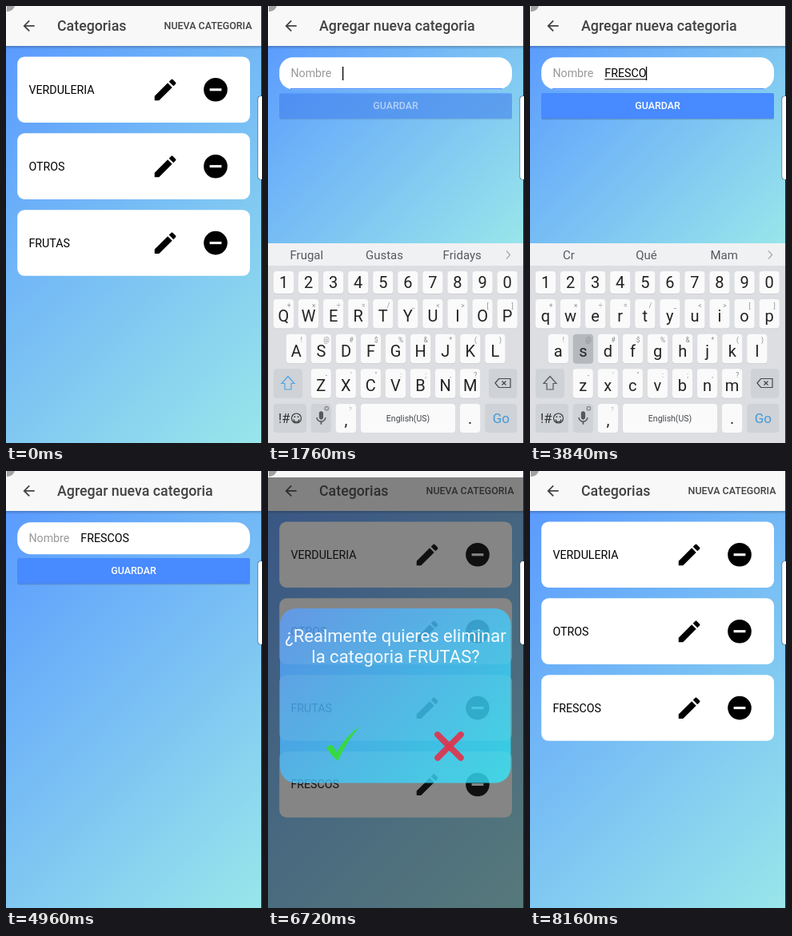
These frames come from a looping animation (320 px wide and 547 px high, 9.76 s). An HTML page with a canvas:

```html
<!DOCTYPE html>
<html lang="es">
<head>
<meta charset="utf-8">
<title>Categorias</title>
<style>
html, body { margin: 0; width: 100%; height: 100%; overflow: hidden; background: #fff; }
canvas { display: block; width: 320px; height: 547px; }
</style>
</head>
<body>
<canvas id="stage"></canvas>
<script>
const W = 320, H = 547, LOOP = 9760, STEP = 160, KEY_TOP = 297;
const canvas = document.getElementById('stage');
const ctx = canvas.getContext('2d');
const dpr = window.devicePixelRatio || 1;
canvas.width = W * dpr;
canvas.height = H * dpr;

const INK = '#424242', BLUE = '#488aff';
const PENCIL = new Path2D('M3 17.25V21h3.75L17.81 9.94l-3.75-3.75L3 17.25zM20.71 7.04c.39-.39.39-1.02 0-1.41l-2.34-2.34c-.39-.39-1.02-.39-1.41 0l-1.83 1.83 3.75 3.75 1.83-1.83z');
const BACK = new Path2D('M20 11H7.83l5.59-5.59L12 4l-8 8 8 8 1.41-1.41L7.83 13H20v-2z');
const MIC = new Path2D('M12 14c1.66 0 3-1.34 3-3V5c0-1.66-1.34-3-3-3S9 3.34 9 5v6c0 1.66 1.34 3 3 3zM17.3 11c0 3-2.54 5.1-5.3 5.1S6.7 14 6.7 11H5c0 3.41 2.72 6.23 6 6.72V21h2v-3.28c3.28-.48 6-3.3 6-6.72h-1.7z');

function text(str, x, y, size, color, align = 'left', weight = 400) {
  ctx.font = `${weight} ${size}px Roboto, sans-serif`;
  ctx.textAlign = align;
  ctx.fillStyle = color;
  ctx.fillText(str, x, y);
}

function rect(x, y, w, h, color) {
  ctx.fillStyle = color;
  ctx.fillRect(x, y, w, h);
}

function box(x, y, w, h, r, color) {
  ctx.beginPath();
  ctx.roundRect(x, y, w, h, r);
  ctx.fillStyle = color;
  ctx.fill();
}

function disc(x, y, r, color) {
  ctx.beginPath();
  ctx.arc(x, y, r, 0, Math.PI * 2);
  ctx.fillStyle = color;
  ctx.fill();
}

function line(points, color, width, close) {
  ctx.beginPath();
  points.forEach(([x, y]) => ctx.lineTo(x, y));
  if (close) ctx.closePath();
  ctx.strokeStyle = color;
  ctx.lineWidth = width;
  ctx.stroke();
}

function icon(path, x, y, scale, color) {
  ctx.save();
  ctx.translate(x, y);
  ctx.scale(scale, scale);
  ctx.fillStyle = color;
  ctx.fill(path);
  ctx.restore();
}

function layer(alpha, dy, draw) {
  ctx.save();
  ctx.globalAlpha *= alpha;
  ctx.translate(0, dy);
  draw();
  ctx.restore();
}

// 135 degree gradient over a box
function diagonal(x, y, w, h, from, to) {
  const cx = x + w / 2, cy = y + h / 2, d = (w + h) / 4;
  const g = ctx.createLinearGradient(cx - d, cy - d, cx + d, cy + d);
  g.addColorStop(0, from);
  g.addColorStop(1, to);
  return g;
}

function backdrop(bottom) {
  rect(0, 8, W, bottom - 8, diagonal(0, 8, W, bottom - 8, '#5797ff', '#99e6ea'));
}

function header(title, action) {
  const shade = ctx.createLinearGradient(0, 50, 0, 54);
  shade.addColorStop(0, 'rgba(0,0,0,.22)');
  shade.addColorStop(1, 'rgba(0,0,0,0)');
  rect(0, 50, W, 4, shade);
  rect(0, 0, W, 50, '#f8f8f8');
  icon(BACK, 17.9, 14.3, 0.889, INK);
  text(title, 64, 31.3, 17.78, INK, 'left', 500);
  if (action) text(action, 307.5, 29.2, 12.44, INK, 'right', 500);
}

function card(label, i) {
  const y = 63.4 + i * 95.9;
  box(14.2, y, 290.8, 82.6, 9, '#fff');
  text(label, 28.4, y + 46.3, 14.22, '#000');
  icon(PENCIL, 181.3, y + 23.8, 1.482, '#000');
  disc(262, y + 41.4, 14.8, '#000');
  rect(254.6, y + 39.8, 14.8, 3.1, '#fff');
}

function listPage(items) {
  backdrop(H);
  items.forEach(card);
  header('Categorias', 'NUEVA CATEGORIA');
}

function formPage(s) {
  backdrop(s.resized ? KEY_TOP : H);
  layer(1, s.slide || 0, () => {
    ctx.save();
    ctx.beginPath();
    ctx.roundRect(14.2, 64.3, 290.8, 40, 17);
    ctx.clip();
    rect(14, 64, 292, 41, '#fff');
    if (s.focus) rect(28, 103, 277, 1.4, BLUE);
    ctx.restore();
    text('Nombre', 28.4, 89.2, 14.22, '#999');
    const typed = s.value || '';
    text(typed, 93.3, 89.2, 14.22, '#000');
    const end = 93.3 + ctx.measureText(typed).width;
    if (typed && s.composing) rect(93.3, 91.3, end - 93.3, 1, '#000');
    if (s.focus) rect(Math.max(93, end - 0.6), 76, 1.3, 17, '#000');

    layer(typed ? 1 : 0.55, 0, () => {
      box(14.2, 110.2, 290.8, 32, 2, 'rgba(0,0,0,.18)');
      box(14.2, 109, 290.8, 32, 2, s.pressed ? '#3f79e0' : BLUE);
      text('GUARDAR', 159.6, 128.8, 12.44, '#fff', 'center', 500);
    });
  });
  header('Agregar nueva categoria');
}

const KEY = '#fafafa', TOOL = '#cfd2d6', DARK = '#222', HINT = '#8b8d90';
const ROWS = [
  { keys: '1234567890', x: 19.5, y: 332, h: 28, base: 353 },
  { keys: 'QWERTYUIOP', hints: '+×÷=/_<>[]', x: 19.5, y: 367, h: 36.5, base: 395 },
  { keys: 'ASDFGHJKL', hints: '!@#$%&*()', x: 35.3, y: 410.7, h: 36.5, base: 439 },
  { keys: 'ZXCVBNM', hints: '-\'":;,?', x: 66.2, y: 454.2, h: 36.5, base: 482 }
];

function keyboard(s) {
  rect(0, KEY_TOP, W, H - KEY_TOP, '#dcdee2');
  rect(0, KEY_TOP, W, 28, '#f0f1f3');
  s.words.forEach((word, i) => text(word, 48.3 + i * 97.2, 317, 15, '#555a5f', 'center'));
  line([[298, 306.5], [302.5, 311.5], [298, 316.5]], '#8e9296', 1.1);

  for (const row of ROWS) {
    [...row.keys].forEach((k, i) => {
      const cx = row.x + i * 31.07;
      box(cx - 12.6, row.y + 0.8, 25.2, row.h, 4, 'rgba(0,0,0,.1)');
      box(cx - 12.6, row.y, 25.2, row.h, 4, k === s.down ? '#b5b8bc' : KEY);
      text(s.upper ? k : k.toLowerCase(), cx, row.base, 20, DARK, 'center');
      if (row.hints) text(row.hints[i], cx + 6.6, row.y + 10.5, 8.5, HINT, 'center');
    });
  }

  box(7, 454.2, 36, 36.5, 4, TOOL);
  line([[25, 463.5], [33, 472.5], [29, 472.5], [29, 480], [21, 480], [21, 472.5], [17, 472.5]],
    s.upper ? '#4aa8e6' : '#55585c', 1.2, true);
  box(276, 454.2, 35.3, 36.5, 4, TOOL);
  line([[284, 472], [288.5, 466.5], [303, 466.5], [303, 477.5], [288.5, 477.5]], '#44474b', 1.2, true);
  line([[292.5, 469.5], [297.5, 474.5]], '#44474b', 1.2);
  line([[297.5, 469.5], [292.5, 474.5]], '#44474b', 1.2);

  box(7, 498, 41, 36, 4, TOOL);
  text('!#', 13, 522, 16.5, '#333');
  ctx.beginPath();
  ctx.arc(35.5, 516, 6, 0, 7);
  ctx.moveTo(38.8, 517.2);
  ctx.arc(35.5, 517.2, 3.3, 0, Math.PI);
  ctx.strokeStyle = '#333';
  ctx.lineWidth = 1.1;
  ctx.stroke();
  disc(33.4, 514.2, 0.9, '#333');
  disc(37.6, 514.2, 0.9, '#333');

  box(53.7, 498, 25.2, 36, 4, TOOL);
  icon(MIC, 56, 505.5, 0.87, '#55585c');
  ctx.beginPath();
  ctx.arc(73.3, 503.8, 2.2, 0, 7);
  ctx.strokeStyle = HINT;
  ctx.lineWidth = 1.5;
  ctx.stroke();

  box(84.8, 498, 25.2, 36, 4, KEY);
  text(',', 97.4, 525, 20, DARK, 'center');
  text('?', 103, 506.5, 8, '#b0b2b5', 'center');
  box(116, 498, 118, 36, 4, KEY);
  text('English(US)', 175, 520, 10.5, '#44474b', 'center');
  box(240, 498, 25.2, 36, 4, KEY);
  text('.', 252.6, 523, 20, DARK, 'center');
  box(271.3, 498, 40, 36, 4, TOOL);
  text('Go', 291.3, 522, 17, '#4499d8', 'center');
}

function dialog(alpha, dim) {
  rect(0, 8, W, H - 8, `rgba(30,30,30,${dim})`);
  layer(alpha, 0, () => {
    box(15, 172, 288.5, 218.5, 20, diagonal(15, 172, 288, 218, '#5a9dff', '#2fecff'));
  });
  layer(Math.min(1, alpha * 1.2), 0, () => {
    text('¿Realmente quieres eliminar', 159.5, 214, 22, '#fff', 'center');
    text('la categoria FRUTAS?', 159.5, 240, 22, '#fff', 'center');

    ctx.beginPath();
    ctx.moveTo(73, 346.5);
    ctx.quadraticCurveTo(77, 342, 80, 343);
    ctx.quadraticCurveTo(83, 346, 85.5, 352);
    ctx.quadraticCurveTo(98, 331, 115.5, 319);
    ctx.quadraticCurveTo(99, 337, 87, 363);
    ctx.quadraticCurveTo(81, 358, 73, 346.5);
    ctx.fillStyle = '#36dc35';
    ctx.fill();

    ctx.lineCap = 'round';
    line([[212, 330], [241, 359]], '#dc374f', 7.6);
    line([[241, 330], [212, 359]], '#dc374f', 7.6);
    ctx.lineCap = 'butt';
  });
}

function edges() {
  disc(2, -2, 9, '#a2a2a2');
  rect(0, 0, 1, 8, '#f8f8f8');
  rect(319, 0, 1, H, '#1c2a38');
  box(314.4, 112.5, 8, 105, 4, 'rgba(40,60,80,.55)');
  box(315.2, 113, 8, 104, 4, '#fff');
}

const FIRST = ['VERDULERIA', 'OTROS', 'FRUTAS'];
const FULL = [...FIRST, 'FRESCOS'];
const LAST = ['VERDULERIA', 'OTROS', 'FRESCOS'];

// time, letters entered, key held down
const TYPING = [
  [1760, 0, ''], [2240, 0, 'F'], [2400, 1, ''], [2720, 1, 'R'], [2880, 2, 'E'],
  [3040, 3, 'S'], [3200, 4, ''], [3520, 5, ''], [3840, 6, 'S'], [4000, 7, '']
];

function typing(t) {
  const [, count, down] = TYPING.filter(k => k[0] <= t).pop();
  const upper = count === 0;
  formPage({
    resized: true, focus: true, composing: t < 4320,
    value: 'FRESCOS'.slice(0, count), pressed: t >= 4320 && t < 4480
  });
  keyboard({ upper, down, words: upper ? ['Frugal', 'Gustas', 'Fridays'] : ['Cr', 'Qué', 'Mam'] });
}

function scene(t) {
  if (t < 640) {
    listPage(FIRST);
  } else if (t < 960) {
    const k = t < 800 ? 0.35 : 0.85;
    listPage(FIRST);
    layer(k, 0, () => formPage({ slide: (1 - k) * 36 }));
  } else if (t < 1760) {
    formPage({ focus: t >= 1440 });
    if (t >= 1600) {
      layer(1, 90, () => keyboard({ upper: true, words: ['Frugal', 'Gustas', 'Fridays'] }));
    }
  } else if (t < 4800) {
    typing(t);
  } else if (t < 5280) {
    formPage({ value: 'FRESCOS' });
    if (t < 4960) layer(1, 110, () => keyboard({ words: ['Cr', 'Qué', 'Mam'] }));
    if (t >= 5120) layer(0.6, 0, () => listPage(FULL));
  } else if (t < 8160) {
    listPage(t < 8000 ? FULL : LAST);
    if (t >= 6720) {
      const alpha = t < 6880 ? 0.78 : t < 7040 ? 0.95 : t < 7840 ? 1 : t < 8000 ? 0.55 : 0.12;
      dialog(alpha, Math.min(0.54, alpha * 0.7));
    }
  } else {
    listPage(LAST);
  }
  edges();
}

const start = performance.now();

function tick(now) {
  const t = Math.max(0, now - start) % LOOP;
  ctx.setTransform(dpr, 0, 0, dpr, 0, 0);
  rect(0, 0, W, H, '#f8f8f8');
  scene(Math.floor(t / STEP) * STEP);
  requestAnimationFrame(tick);
}
tick(start);
</script>
</body>
</html>
```
